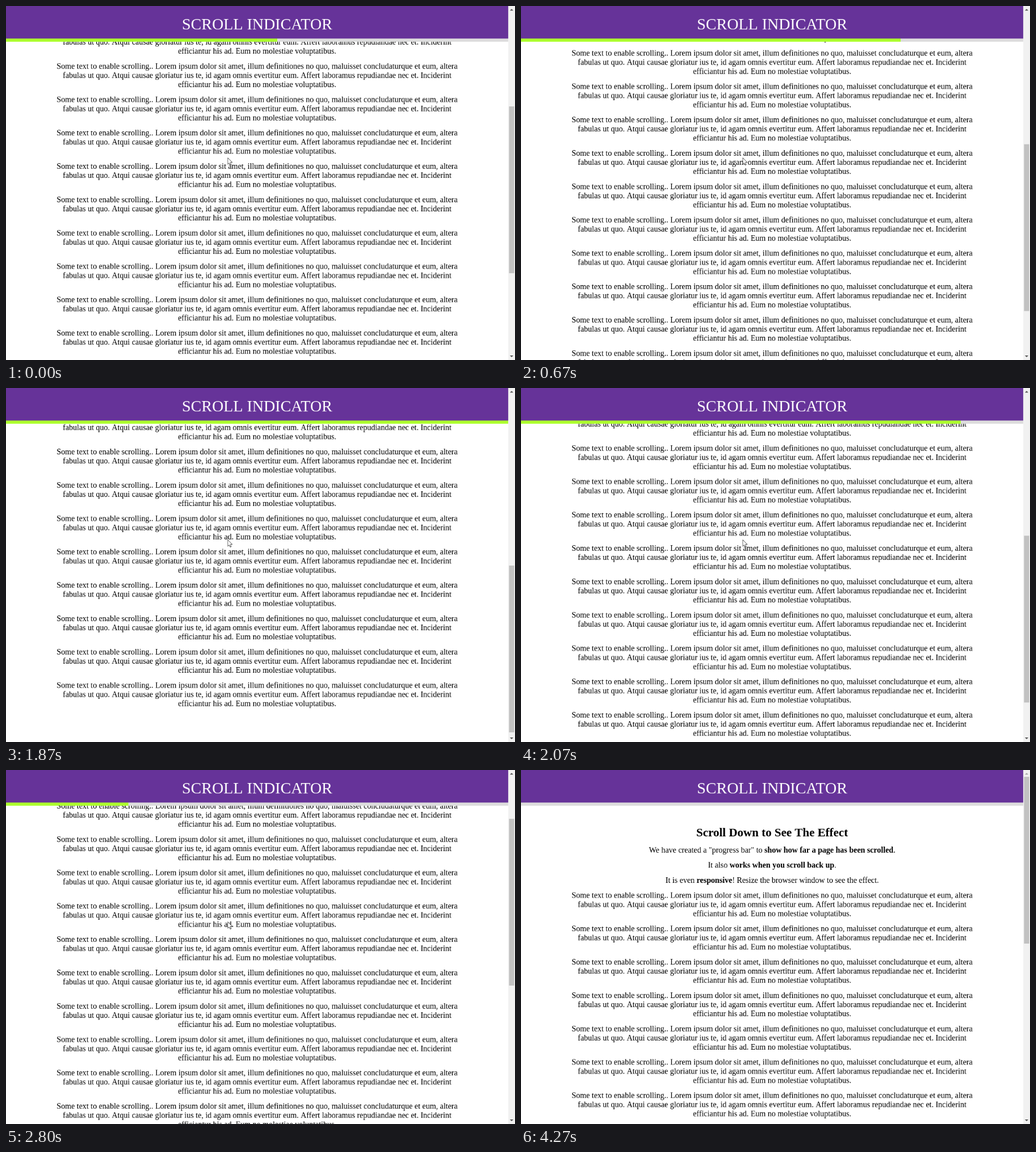
An HTML page with a canvas for the animation above (4.87 s loop, 897x624 px).

```html
<!DOCTYPE html>
<html lang="en">
<head>
<meta charset="utf-8">
<title>Scroll Indicator</title>
<style>
  html, body { margin: 0; width: 100%; height: 100%; overflow: hidden; background: #fff; }
  canvas { display: block; }
</style>
</head>
<body>
<canvas id="stage" width="897" height="624"></canvas>
<script>
// The page is painted on a larger buffer and shrunk by ZOOM onto the stage.
const ZOOM = 0.7;
const stage = document.getElementById('stage').getContext('2d', { alpha: false });
const buffer = document.createElement('canvas');
buffer.width = 1282;
buffer.height = 892;
const ctx = buffer.getContext('2d', { alpha: false });
ctx.scale(1 / ZOOM, 1 / ZOOM);
ctx.letterSpacing = '0.001px'; // keeps "fi" from forming a ligature

const LOOP = 4870, TICK = 200 / 3;
const PAGE_W = 885.1, VIEW_H = 624, MAX_SCROLL = 648.2;
const HEADER_H = 57.4, BAR_H = 5.6;
const TRACK_TOP = 11.9, TRACK_END = 612.1, THUMB_H = 294;
const LINE = 16.1, PARAGRAPH = 58.8, PARAGRAPHS = 17;
const FAMILY = '"Liberation Serif", "Times New Roman", serif';

const LOREM = [
  'Some text to enable scrolling.. Lorem ipsum dolor sit amet, illum definitiones no quo, maluisset concludaturque et eum, altera',
  'fabulas ut quo. Atqui causae gloriatur ius te, id agam omnis evertitur eum. Affert laboramus repudiandae nec et. Inciderint',
  'efficiantur his ad. Eum no molestiae voluptatibus.'
];

// Odd entries of a line are bold.
const INTRO = [
  { y: 116.9, size: 21, runs: ['', 'Scroll Down to See The Effect'] },
  { y: 145.6, size: 14, runs: ['We have created a "progress bar" to ', 'show how far a page has been scrolled', '.'] },
  { y: 172.2, size: 14, runs: ['It also ', 'works when you scroll back up', '.'] },
  { y: 198.8, size: 14, runs: ['It is even ', 'responsive', '! Resize the browser window to see the effect.'] }
];

// [tick, scroll offset]
const SCROLL_KEYS = [
  [0, 350], [1, 350], [2, 351.5], [3, 351.5], [4, 362], [8, 481], [9, 490], [10, 490.8],
  [11, 510], [15, 640], [16, MAX_SCROLL], [27, MAX_SCROLL], [28, 637.4], [29, 608],
  [35, 363.5], [36, 323], [40, 172], [41, 158], [42, 157.6], [43, 148], [45, 95], [46, 1.4], [49, 0]
];

function scrollAt(tick) {
  const next = SCROLL_KEYS.findIndex(key => key[0] > tick);
  if (next < 0) return 0;
  const [t0, v0] = SCROLL_KEYS[next - 1];
  const [t1, v1] = SCROLL_KEYS[next];
  return v0 + (v1 - v0) * (tick - t0) / (t1 - t0);
}

function tickAt(time) {
  const start = n => Math.round(n * TICK / 10) * 10;
  let n = Math.ceil(time / TICK);
  while (start(n) > time) n--;
  return n;
}

const snap = v => Math.round(v / ZOOM) * ZOOM;

function rect(color, x, y, w, h) {
  ctx.fillStyle = color;
  ctx.fillRect(x, y, w, h);
}

function shape(color, points) {
  ctx.beginPath();
  points.forEach(([x, y]) => ctx.lineTo(x, y));
  ctx.closePath();
  ctx.fillStyle = color;
  ctx.fill();
}

// Words are placed one by one, so that no kerning happens across spaces.
function centered(runs, size, y, color = '#000') {
  const words = [];
  let width = 0;
  runs.forEach((run, i) => {
    const font = `${i % 2 ? 'bold ' : ''}${size}px ${FAMILY}`;
    ctx.font = font;
    run.split(/( )/).forEach(text => {
      words.push({ text, font, x: width });
      width += ctx.measureText(text).width;
    });
  });
  const left = (PAGE_W - width) / 2;
  ctx.fillStyle = color;
  words.forEach(({ text, font, x }) => {
    ctx.font = font;
    ctx.fillText(text, left + x, snap(y));
  });
}

function drawPage(scroll) {
  INTRO.forEach(({ y, size, runs }) => {
    if (y - scroll > 40) centered(runs, size, y - scroll);
  });
  for (let p = 0; p < PARAGRAPHS; p++) {
    LOREM.forEach((text, i) => {
      const y = 225.4 + p * PARAGRAPH + i * LINE - scroll;
      if (y > 40 && y < VIEW_H + 20) centered([text], 14, y);
    });
  }
}

function drawHeader(progress) {
  rect('#663399', 0, 0, PAGE_W, HEADER_H);
  centered(['SCROLL INDICATOR'], 28, 41.3, '#fff');
  rect('#ddd', 0, HEADER_H, PAGE_W, BAR_H);
  rect('#adff2f', 0, HEADER_H, snap(PAGE_W * progress), BAR_H);
}

function drawScrollbar(scroll) {
  const arrow = enabled => enabled ? '#505050' : '#a3a3a3';
  const travel = TRACK_END - TRACK_TOP - THUMB_H;
  rect('#f1f1f1', PAGE_W, 0, 13, VIEW_H + 1);
  rect('#c1c1c1', PAGE_W + 1.4, snap(TRACK_TOP + travel * scroll / MAX_SCROLL), 9.1, THUMB_H);
  shape(arrow(scroll > 0), [[888, 8], [891, 5], [894, 8]]);
  shape(arrow(scroll < MAX_SCROLL), [[888, 616], [891, 619], [894, 616]]);
}

function drawCursor(tick) {
  if (tick >= 64) return;
  const p = Math.max(0, (tick - 56) / 7);
  const eased = p * p * (3 - 2 * p);
  ctx.save();
  ctx.translate(390.5 - 290 * eased, 267 + 326 * eased);
  shape('#fff', [[0.3, 0.5], [0.3, 12], [2.9, 9.6], [4.6, 13.5], [6.4, 12.7], [4.8, 8.8], [8.2, 8.6]]);
  ctx.strokeStyle = '#111';
  ctx.lineWidth = 0.7;
  ctx.stroke();
  ctx.restore();
}

function draw(time) {
  const tick = tickAt(time % LOOP);
  const scroll = scrollAt(tick);
  rect('#fff', 0, 0, 898, VIEW_H + 1);
  drawPage(scroll);
  // The indicator follows the page one tick late.
  drawHeader(scrollAt(Math.max(0, tick - 1)) / MAX_SCROLL);
  drawScrollbar(scroll);
  drawCursor(tick);
  stage.drawImage(buffer, 0, 0, buffer.width * ZOOM, buffer.height * ZOOM);
}

const begin = performance.now();
function loop() {
  draw(performance.now() - begin);
  requestAnimationFrame(loop);
}
loop();
</script>
</body>
</html>
```
